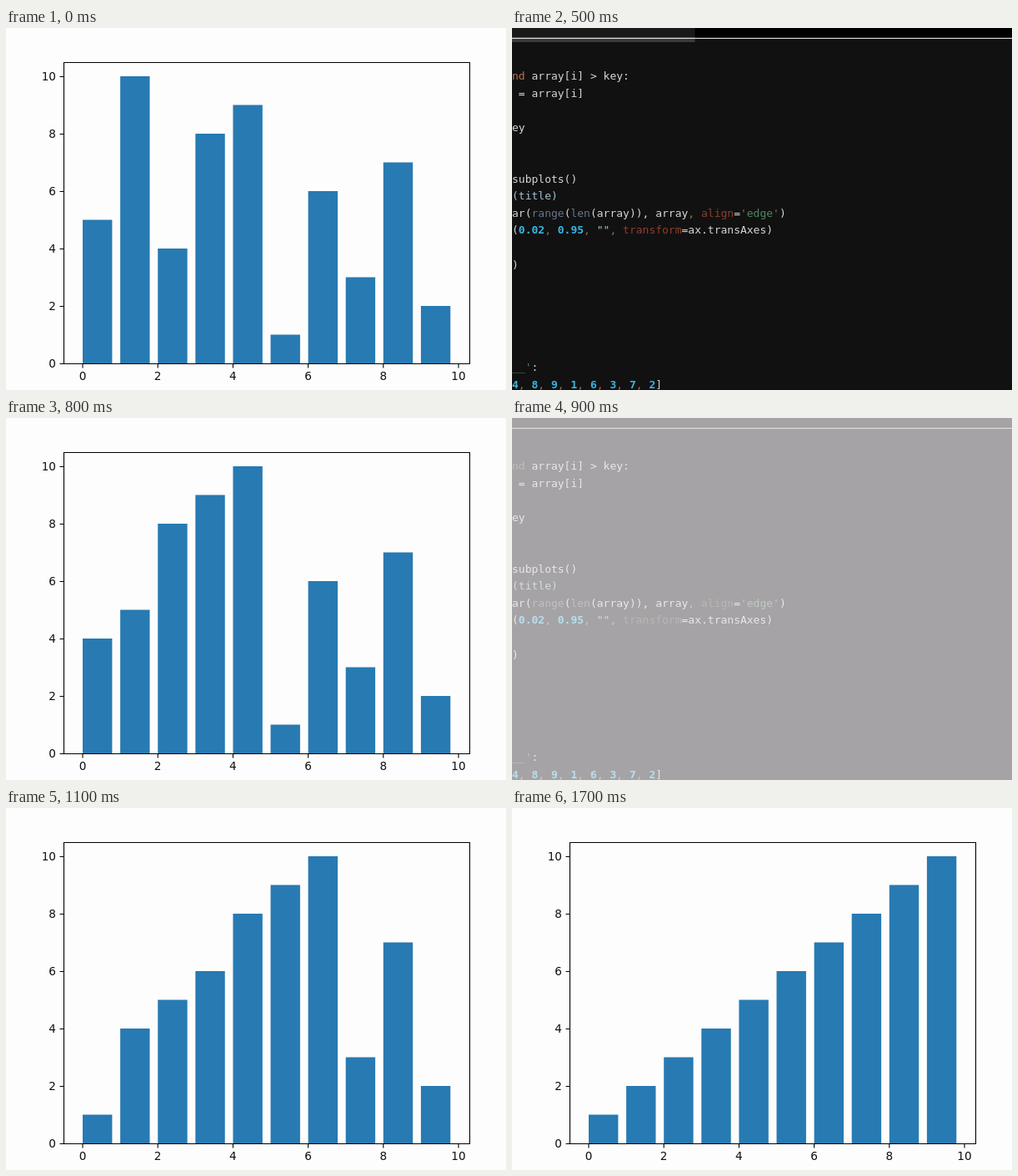
Animation of 600x435 px, one loop 1.8 s. Source, as an HTML page:

```html
<!DOCTYPE html>
<html lang="en">
<head>
<meta charset="utf-8">
<title>Insertion sort</title>
<style>
  html, body { margin: 0; width: 100%; height: 100%; overflow: hidden; background: #fefdfe; }
  svg { position: absolute; left: 0; top: 0; width: 600px; height: 435px; }
  #chart text { font: 13.6px "DejaVu Sans", sans-serif; fill: #111; }
  #bars rect { fill: #277ab2; }
  #axes path { fill: none; stroke: #000; stroke-width: 1.1; }
  #code {
    --bg: #121112; --top: #000; --tab: #1a191a; --edge: #3a393a; --rule: #d8d6d8;
    --text: #d6d6d6; --num: #38b6e2; --arg: #8c3f2b; --word: #c4704f;
    --call: #64788c; --str: #4c8a5c; --name: #9fc3d2; --dim: #9a6a58;
  }
  #code.faded {
    --bg: #a5a3a5; --top: #a5a3a5; --tab: #a5a3a5; --edge: #a5a3a5; --rule: #dddbdd;
    --text: #e9e8e9; --num: #b5e0f0; --arg: #bcb6b5; --word: #c4bcba;
    --call: #bfc1c4; --str: #c3c9c4; --name: #d6dcdf; --dim: #cfc9c7;
  }
  #code text { font: 13px "DejaVu Sans Mono", monospace; white-space: pre; fill: var(--text); }
  #code .num { fill: var(--num); font-weight: bold; }
  #code .arg { fill: var(--arg); }
  #code .word { fill: var(--word); }
  #code .call { fill: var(--call); }
  #code .str { fill: var(--str); }
  #code .name { fill: var(--name); }
  #code .dim { fill: var(--dim); }
</style>
</head>
<body>
<svg id="chart" viewBox="0 0 600 435">
  <rect width="600" height="435" fill="#fefdfe"/>
  <g id="bars"></g>
  <g id="axes"><path d="M69.5 41.5H556.5V403.5H69.5Z"/></g>
</svg>
<svg id="code" viewBox="0 0 600 435">
  <rect width="600" height="435" style="fill:var(--bg)"/>
  <rect width="600" height="12" style="fill:var(--top)"/>
  <rect width="219.5" height="12" style="fill:var(--tab)"/>
  <rect y="11" width="219.5" height="6" style="fill:var(--edge)"/>
  <rect y="11.8" width="600" height="1.2" style="fill:var(--rule)"/>
</svg>
<script>
const LOOP = 1800, STEP = 100;
const X0 = 92, PITCH = 45.1, BASE = 403, UNIT = 34.5;
const chart = document.getElementById("chart");
const code = document.getElementById("code");
const axes = document.getElementById("axes");
const start = [5, 10, 4, 8, 9, 1, 6, 3, 7, 2];

function add(parent, tag, attrs, text) {
  const el = document.createElementNS("http://www.w3.org/2000/svg", tag);
  for (const key in attrs) el.setAttribute(key, attrs[key]);
  if (text !== undefined) el.textContent = text;
  return parent.appendChild(el);
}

// Axis ticks and labels
for (let n = 0; n <= 10; n += 2) {
  const x = X0 + n * PITCH, y = BASE - n * UNIT;
  add(axes, "path", { d: `M${x} 403.5v5M69.5 ${y + 0.5}h-5` });
  add(axes, "text", { x, y: 423, "text-anchor": "middle" }, n);
  add(axes, "text", { x: 60, y: y + 5, "text-anchor": "end" }, n);
}

const bars = start.map((v, i) =>
  add(document.getElementById("bars"), "rect", { x: X0 + i * PITCH, width: PITCH * 0.785 }));

// Visible code: [row, ...parts], where a part is plain text or [class, text]
const nums = list => list.split(", ").flatMap((n, i) =>
  i ? [["dim", ", "], ["num", n]] : [["num", n]]);
const lines = [
  [0, ["word", "nd"], " array[i] > key:"],
  [1, " = array[i]"],
  [3, "ey"],
  [6, "subplots()"],
  [7, ["name", "(title)"]],
  [8, "ar(", ["call", "range"], "(", ["call", "len"], "(array)), array", ["dim", ", "],
    ["arg", "align"], "=", ["str", "'edge'"], ")"],
  [9, "(", ...nums("0.02, 0.95"), ["dim", ", "], ["name", '""'], ["dim", ", "],
    ["arg", "transform"], "=ax.transAxes)"],
  [11, ")"],
  [17, ["str", "__'"], ":"],
  [18, ...nums("4, 8, 9, 1, 6, 3, 7, 2"), "]"]
];
for (const [row, ...parts] of lines) {
  const line = add(code, "text", { x: 0, y: 62 + row * 20.6 });
  for (const part of parts) {
    const [kind, text] = Array.isArray(part) ? part : ["", part];
    add(line, "tspan", { class: kind }, text);
  }
}

// State of the list once the first `count` insertions are done
function sorted(count) {
  const head = start.slice(0, count + 1).sort((a, b) => a - b);
  return head.concat(start.slice(count + 1));
}

function draw(now) {
  const tick = Math.floor((now % LOOP) / STEP);
  const open = tick === 5, fading = tick === 9;
  code.style.display = open || fading ? "" : "none";
  code.classList.toggle("faded", fading);
  const count = tick < 6 ? 1 : tick < 9 ? tick - 4 : Math.min(tick - 5, 9);
  sorted(count).forEach((v, i) => {
    bars[i].setAttribute("y", BASE - v * UNIT);
    bars[i].setAttribute("height", v * UNIT);
  });
}

const begin = performance.now();
function loop() {
  draw(performance.now() - begin);
  requestAnimationFrame(loop);
}
loop();
</script>
</body>
</html>
```
